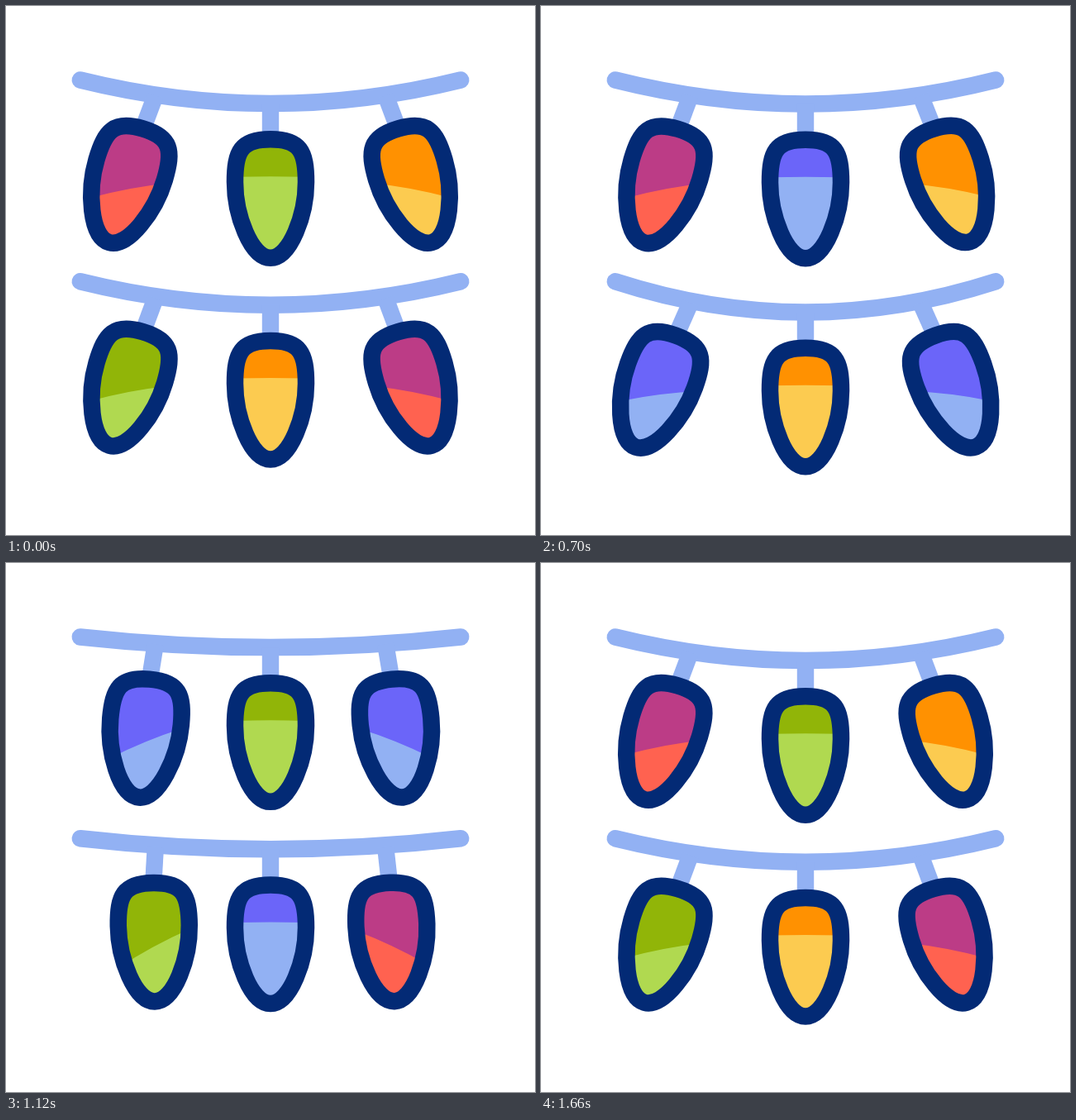
An HTML page with a canvas for the animation above (1800 ms loop, 640 px wide and 640 px high).

```html
<!DOCTYPE html>
<html lang="en">
<head>
<meta charset="utf-8">
<title>String lights</title>
<style>
  html, body { margin: 0; width: 100%; height: 100%; overflow: hidden; background: #fff; }
  canvas { display: block; width: 640px; height: 640px; }
</style>
</head>
<body>
<canvas id="stage" width="640" height="640"></canvas>
<script>
const ctx = document.getElementById('stage').getContext('2d');
const LOOP = 1800;
const NAVY = '#032a75', WIRE = '#92b1f3';

// [upper part, lower part]
const GREEN = ['#91b508', '#b0d950'];
const ORANGE = ['#ff9101', '#fccb50'];
const RED = ['#bc3c86', '#ff6250'];
const BLUE = ['#6b65f9', '#92b1f3'];

// Sag and tilts are [rest, low swing, high swing].
// blink: 0 = first group to turn blue, 1 = second group.
const rows = [
  {
    y: 89.5, delay: 0, drop: 0.5, sag: [28.5, 36.1, 10.7],
    left: { tilt: [16.5, 21.3, 3.8], color: RED, blink: 1 },
    middle: { color: GREEN, blink: 0 },
    right: { tilt: [16.5, 22.8, 4.2], color: ORANGE, blink: 1 }
  },
  {
    y: 333.3, delay: 105, drop: 2.3, sag: [28.5, 38.6, 12.9],
    left: { tilt: [16.4, 21, -0.8], color: GREEN, blink: 0 },
    middle: { color: ORANGE, blink: 1 },
    right: { tilt: [16.4, 21, 2.3], color: RED, blink: 0 }
  }
];

// Bulb and shade edges, measured from the point where the stem meets the wire
const bulb = new Path2D('M43 95C43 134 24 186.8 0 186.8S-43 134-43 95C-43 58-36 43.3 0 43.3S43 58 43 95Z');
const levelShade = new Path2D('M-50 89Q0 87.6 50 89V30H-50Z');
const slantShade = new Path2D('M-46 147Q1 117 50 97V30H-50Z');
const JOINT = 47; // where the bulb meets its stem
const LEAN = 4;   // extra tilt of the side stems

const rad = deg => deg * Math.PI / 180;
const ease = x => (1 - Math.cos(Math.PI * Math.min(1, Math.max(0, x)))) / 2;
const mix = (a, b, k) => a + (b - a) * k;

function swing([rest, low, high], t) {
  if (t < 520) return mix(rest, low, ease(t / 520));
  if (t < 1030) return mix(low, high, ease((t - 520) / 510));
  const left = Math.max(0, 1 - (t - 1030) / 530);
  return mix(high, rest, ease(1 - left ** 1.25));
}

function drawBulb([upper, lower], shade) {
  ctx.fillStyle = lower;
  ctx.fill(bulb);
  ctx.save();
  ctx.clip(bulb);
  ctx.fillStyle = upper;
  ctx.fill(shade);
  ctx.restore();
  ctx.strokeStyle = NAVY;
  ctx.lineWidth = 20.5;
  ctx.stroke(bulb);
}

function drawLight(light, x, y, t, flip, blue) {
  const tilt = light.tilt ? swing(light.tilt, t) : 0;
  const lean = light.tilt ? LEAN : 0;
  ctx.save();
  ctx.translate(x, y);
  ctx.scale(flip, 1);
  ctx.rotate(rad(tilt + lean));
  ctx.fillStyle = WIRE;
  ctx.fillRect(-10.2, 0, 20.4, 50);
  ctx.translate(0, JOINT);
  ctx.rotate(rad(-lean));
  ctx.translate(0, -JOINT);
  drawBulb(light.blink === blue ? BLUE : light.color, light.tilt ? slantShade : levelShade);
  ctx.restore();
}

function drawRow(row, time) {
  const t = time - row.delay;
  const sag = swing(row.sag, t);
  const blue = Math.floor(time / 540) - 1;

  ctx.strokeStyle = WIRE;
  ctx.lineWidth = 20.5;
  ctx.lineCap = 'round';
  ctx.beginPath();
  ctx.moveTo(89.8, row.y);
  ctx.quadraticCurveTo(320, row.y + sag * 2, 550.2, row.y);
  ctx.stroke();

  const sideY = row.y + sag * 0.63 + row.drop;
  drawLight(row.left, 180.8, sideY, t, 1, blue);
  drawLight(row.middle, 320, row.y + sag, t, 1, blue);
  drawLight(row.right, 459.2, sideY, t, -1, blue);
}

const start = performance.now();

function frame() {
  const time = Math.max(0, performance.now() - start) % LOOP;
  ctx.fillStyle = '#fff';
  ctx.fillRect(0, 0, 640, 640);
  for (const row of rows) drawRow(row, time);
  requestAnimationFrame(frame);
}
frame();
</script>
</body>
</html>
```
